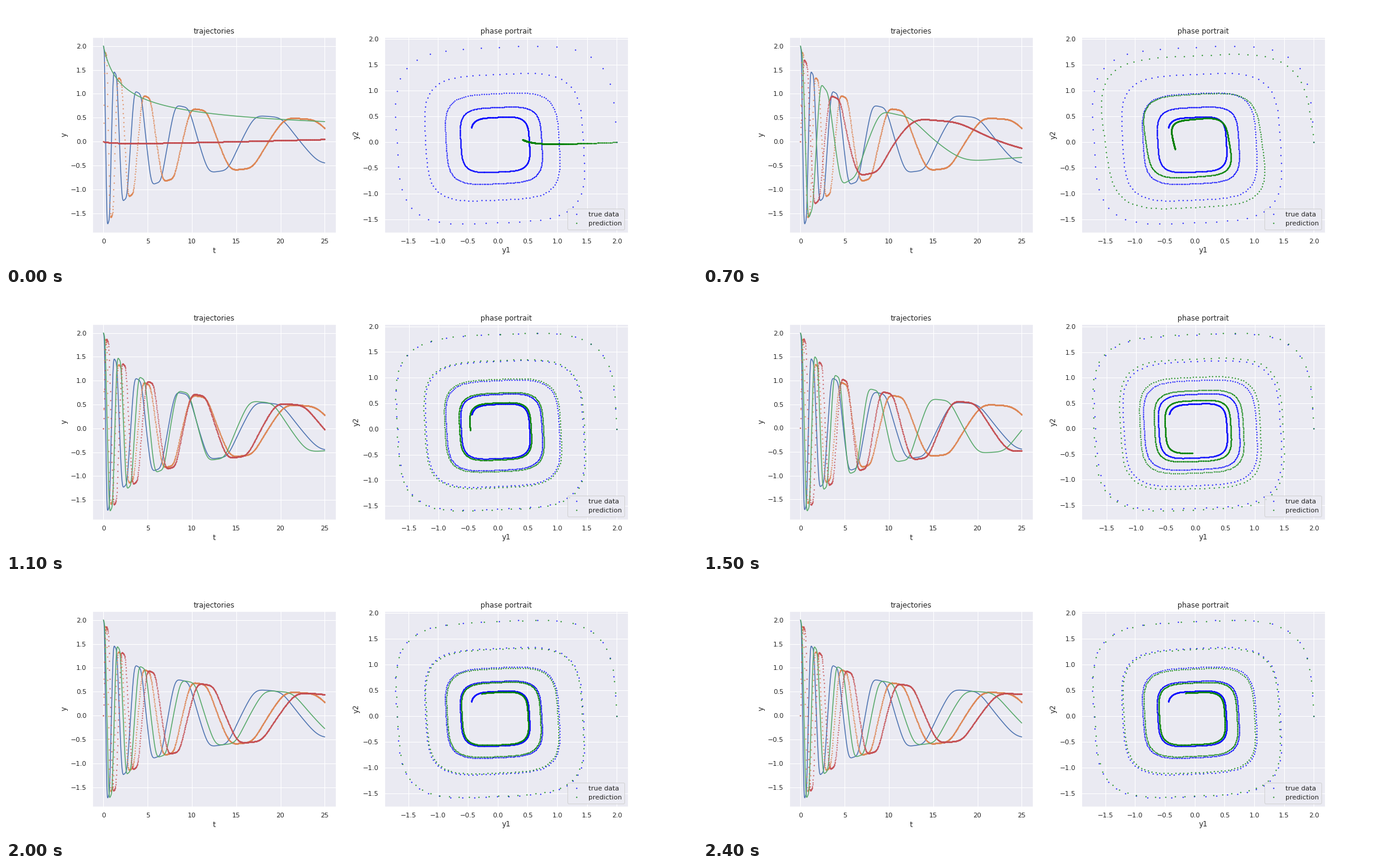
These frames come from a looping animation (1152x432 px, 2.5 s). A matplotlib script:

```python
import numpy as np
import matplotlib.pyplot as plt
from matplotlib.animation import FuncAnimation

FRAMES, INTERVAL = 25, 100
INK = "0.15"

plt.rcParams.update({
    "font.family": "DejaVu Sans", "font.size": 12,
    "axes.titlesize": 12, "axes.labelsize": 12,
    "xtick.labelsize": 11, "ytick.labelsize": 11, "legend.fontsize": 11,
    "text.color": INK, "axes.labelcolor": INK,
    "xtick.color": INK, "ytick.color": INK,
    "axes.facecolor": "#EAEAF2", "axes.edgecolor": "white",
    "axes.linewidth": 1.25, "axes.axisbelow": True, "axes.grid": True,
    "grid.color": "white", "grid.linewidth": 1, "grid.linestyle": "-",
    "xtick.bottom": False, "ytick.left": False,
    "xtick.major.size": 6, "ytick.major.size": 6,
    "lines.linewidth": 1.5, "lines.solid_capstyle": "round",
})

T = np.linspace(0, 25, 1000)
SUBSTEPS = 2


def model(damp, speed=1, drag=0, damp2=None, spin1=2, spin2=2, leak=0, lift=0):
    """Parameters of a damped cubic oscillator."""
    damp2 = damp if damp2 is None else damp2
    return np.array([damp, damp2, spin1, spin2, leak, lift, speed, drag], float)


def field(y, m):
    damp1, damp2, spin1, spin2, leak, lift, speed, drag = m
    p, q = y**3
    # Fast outer motion saturates with drag
    s = speed / (1 + drag * np.sum(y**4, axis=0)**1.5)
    return s * np.array([-damp1 * p - spin1 * q - leak * y[0],
                         spin2 * p - damp2 * q - leak * y[1] + lift])


def solve(m):
    """Runge-Kutta paths from (2, 0), one for each column of m."""
    h = T[1] / SUBSTEPS
    y = np.zeros((2, m.shape[1]))
    y[0] = 2
    path = [y]
    for _ in T[1:]:
        for _ in range(SUBSTEPS):
            k1 = field(y, m)
            k2 = field(y + h / 2 * k1, m)
            k3 = field(y + h / 2 * k2, m)
            k4 = field(y + h * k3, m)
            y = y + h / 6 * (k1 + 2 * k2 + 2 * k3 + k4)
        path.append(y)
    return np.array(path).transpose(2, 1, 0)


# Stages of training; the models between them are interpolated
STAGES = {
    0: model(.1085, spin1=0, spin2=-.0055, lift=.0052),
    4: model(.35, .49, .01, damp2=.136, spin2=1.3, leak=.05),
    9: model(.0841, 1.073, .0172),
    11: model(.0964, 1.014, .0146),
    15: model(.0909, 1.049, .0159),
    20: model(.103, 1.024, .0124),
    24: model(.1039, 1.016, .0121),
}
keys = list(STAGES)
models = np.array([np.interp(np.arange(FRAMES), keys, values)
                   for values in np.transpose(list(STAGES.values()))])
paths = solve(models)
true_y = solve(model(.1)[:, None])[0]

fig, (left, right) = plt.subplots(1, 2, figsize=(16, 6), dpi=72)
fig.subplots_adjust(left=.125, right=.9, bottom=.125, top=.88, wspace=.2)
dots = dict(ls="none", marker=".", ms=2)

left.plot(T, true_y[0], color="#4C72B0")
left.plot(T, true_y[1], color="#DD8452", **dots)
pred1, = left.plot(T, paths[0, 0], color="#55A868")
pred2, = left.plot(T, paths[0, 1], color="#C44E52", **dots)
left.set(title="trajectories", xlabel="t", ylabel="y")

right.plot(*true_y, color="b", label="true data", **dots)
phase, = right.plot(*paths[0], color="g", label="prediction", **dots)
right.set(title="phase portrait", xlabel="y1", ylabel="y2")
right.legend(loc="lower right")


def update(i):
    y1, y2 = paths[i]
    pred1.set_data(T, y1)
    pred2.set_data(T, y2)
    phase.set_data(y1, y2)
    for ax in (left, right):
        ax.relim()
        ax.autoscale_view()
    return pred1, pred2, phase


anim = FuncAnimation(fig, update, frames=FRAMES, interval=INTERVAL,
                     init_func=lambda: update(0), repeat=True, repeat_delay=0)
plt.show()
```
